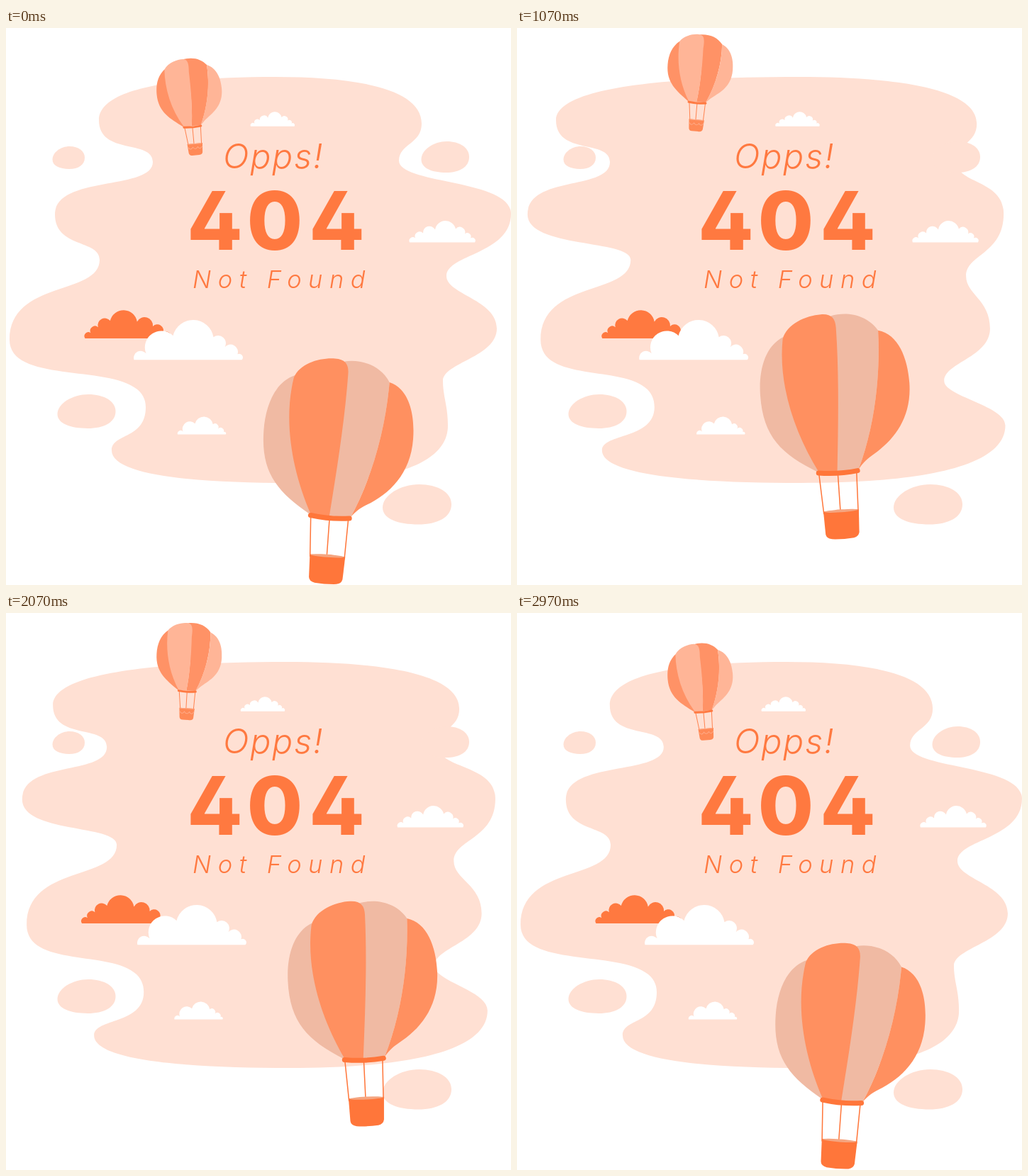
These frames come from a looping animation (712 px wide and 786 px high, 3.01 s). An HTML page:

```html
<!DOCTYPE html>
<html lang="en">
<head>
<meta charset="utf-8">
<title>404 Not Found</title>
<style>
  html, body { margin: 0; width: 100%; height: 100%; overflow: hidden; background: #fff; }
  svg { display: block; width: 100vw; height: 100vh; }
  text { font-family: Inter, "Open Sans", sans-serif; fill: #ff7940; }
  .hello { font-size: 48px; font-weight: 300; font-style: italic; letter-spacing: 2px; }
  .code { font-size: 114px; font-weight: 800; text-anchor: middle; font-feature-settings: "cv02"; }
  .note { font-size: 34.5px; font-weight: 300; font-style: italic; letter-spacing: 9.5px; }
  .line { fill: none; stroke-linecap: round; }
</style>
</head>
<body>
<svg viewBox="0 0 712 786" xmlns="http://www.w3.org/2000/svg">
  <g id="back" fill="#ffe0d3"><path id="blob"/></g>
  <g id="clouds"></g>

  <text class="hello" x="306" y="197.500">Opps!</text>
  <text class="code" x="294.500 379 466.500" y="312.500">404</text>
  <text class="note" x="263" y="367">Not Found</text>

  <g id="small">
    <path fill="#ff9266" d="M226 38C216 46 212 58 212 72C212 98 228 108 245 121H256L240 60Z"/>
    <path fill="#ff9266" d="M254 26C268 24 279 28 286 37C288 65 282 95 270 121H257C260 100 261 75 258 40Z"/>
    <path fill="#ffb597" d="M226 38C232 29 246 25 254 26C260 27 261 33 260 45C261 75 260 100 257 121H246C230 95 224 65 226 38Z"/>
    <path fill="#ffb597" d="M286 37C300 43 304 58 304 72C304 98 286 106 276 115L270 121C282 95 288 65 286 37Z"/>
    <path class="line" stroke="#ff8350" d="M247 123L250 148M258 123V147M269.500 123L268.500 148"/>
    <path class="line" stroke="#ff7a42" stroke-width="3" d="M246 122Q258 123.500 270 122"/>
    <path fill="#ff8a57" d="M248.500 146H270L269 159Q268.500 162.500 264 162.500H254Q250 162.500 249.500 159Z"/>
    <path class="line" stroke="#ffa985" d="M250 146.500H268.500M249.500 151Q252.500 156 256 151Q259.500 156 263 151Q266 156 269 151"/>
  </g>

  <g id="large">
    <path fill="#f0baa3" d="M378 463C350 475 340 510 340 543C340 602 364 628 414 657H440L420 500Z"/>
    <path fill="#f0baa3" d="M447 438C470 433 498 440 512 463C511 530 497 600 471 657H440C446 590 450 520 447 438Z"/>
    <path fill="#ff9060" d="M377 466C384 445 412 435 433 435C448 435 453 442 453 455C453 520 447 590 441 657H415C385 600 366 530 377 466Z"/>
    <path fill="#ff9060" d="M512 463C540 470 551 505 551 540C551 590 523 620 492 638C482 644 476 650 471 657C497 600 511 530 512 463Z"/>
    <path class="line" stroke="#ff763a" stroke-width="1.500" d="M415 661L418 716M441.500 661V714M468 661L466.500 716"/>
    <path class="line" stroke="#ff763a" stroke-width="7" d="M414.500 658Q442 662 469.500 658.500"/>
    <path fill="#ff763a" d="M417.500 713L418.500 745Q419 751 427 752.500Q442 754 458 752.500Q465 751 466 745L467.500 713Z"/>
    <ellipse fill="#f5a580" cx="442.500" cy="713.500" rx="23.500" ry="2"/>
  </g>
</svg>

<script>
const LOOP = 3010;
const { sin, cos, PI } = Math;
const $ = id => document.getElementById(id);
const ease = u => (1 - cos(PI * u)) / 2;
const mix = (a, b, u) => a + (b - a) * u;

function add(parent, fill, d) {
  const path = document.createElementNS("http://www.w3.org/2000/svg", "path");
  path.setAttribute("d", d);
  if (fill) path.setAttribute("fill", fill);
  return parent.appendChild(path);
}

// Lobes and bays of the blob: x, y, sideways travel, roundness.
// The two nodes without roundness are the flat top and bottom.
const NODES = [
  [380, 69, 21],
  [586, 135, 77, .55],
  [554, 187, 80, .45],
  [712, 262, -32, .65],
  [621, 350, 15, .35],
  [692, 424, -31, .55],
  [616, 498, -17, .35],
  [623, 561, 81, .45],
  [400, 642, 0],
  [149, 596, -36, .4],
  [197, 535, -4, .75],
  [5, 440, 35, .75],
  [132, 327, 35, .45],
  [69, 263, -67, .75],
  [207, 189, -94, .55],
  [131, 130, -94, .85]
];

function blobPath(p) {
  const pts = NODES.map(([x, y, shift, round]) => [x + shift * p, y, round]);
  const handle = ([x, y, round], [tx, ty, toRound]) =>
    round ? [x, mix(y, ty, toRound ? round : .78)] : [mix(x, tx, .52), y];
  return pts.reduce((d, a, i) => {
    const b = pts[(i + 1) % pts.length];
    return `${d}C${handle(a, b)} ${handle(b, a)} ${b[0]} ${b[1]}`;
  }, `M${pts[0][0]} ${pts[0][1]}`) + "Z";
}

function pebble(x, y, w, h) {
  const q = (u, v) => `${x + u * w} ${y + v * h} `;
  add($("back"), "", "M" + q(0, .58) +
    "C" + q(0, .27) + q(.26, 0) + q(.53, 0) + "C" + q(.8, 0) + q(1, .2) + q(1, .5) +
    "C" + q(1, .82) + q(.8, 1) + q(.52, 1) + "C" + q(.22, 1) + q(0, .86) + q(0, .58) + "Z");
}
pebble(65.5, 167, 45.5, 32);
pebble(585.5, 160, 67.5, 44);
pebble(72.5, 517, 82, 48);
pebble(531, 644, 97, 56.5);

// Cloud outline: round bumps between points above a flat base.
function bumps(...pts) {
  return pts.reduce((d, [x, y], i) => {
    const [px, py] = pts[i - 1] || [0, 0];
    const r = .51 * Math.hypot(x - px, y - py);
    return `${d}A${r} ${r} 0 0 1 ${x} ${-y}`;
  }, "M0 0") + "Z";
}
const PUFF = bumps([8, 6], [19, 13], [36, 18], [65, 19], [78, 12], [86, 6], [92, 0]);
const HEAP = bumps([17, 9], [55, 34], [112, 32], [128, 18], [146, 8], [152, 0]);

// Each cloud drifts to one side, then the other, then home.
function cloud(d, fill, x, y, size, one, two, flip = 1) {
  const el = add($("clouds"), fill, d), stops = [0, one, two, 0];
  return t => {
    const third = 3 * t / LOOP, n = Math.floor(third);
    const dx = mix(stops[n], stops[n + 1], ease(third - n));
    el.setAttribute("transform", `translate(${x + dx} ${y}) scale(${flip * size} ${size})`);
  };
}
const clouds = [
  cloud(PUFF, "#fff", 345, 138.7, .67, 20, -14),
  cloud(PUFF, "#fff", 569, 302.5, 1, -11, -17),
  cloud(PUFF, "#ff7940", 232, 438, 1.31, 9, -4.5, -1),
  cloud(HEAP, "#fff", 180.5, 468.3, 1, -8, 5),
  cloud(HEAP, "#fff", 242, 573.5, .445, 11.5, -4.5)
];

function pose(el, x, y, angle, cx, cy) {
  el.setAttribute("transform", `translate(${x} ${y}) rotate(${angle}) translate(${-cx} ${-cy})`);
}

function draw(now) {
  const t = now % LOOP, a = 2 * PI * t / LOOP, p = ease(2 * t / LOOP);
  $("blob").setAttribute("d", blobPath(p));
  clouds.forEach(move => move(t));
  pose($("small"), 258.3, 89.4 - 42 * p, 12.5 * p - 5.2, 258, 72);
  // The large balloon circles on a slightly skewed loop.
  const x = 472.5 - 4 * cos(a) - 27 * sin(a) + 5.5 * sin(2 * a);
  const y = 535.5 + 41.5 * cos(a) + 4 * sin(a);
  pose($("large"), x, y, 4.14 - 10 * p, 445.5, 545);
}

function tick() {
  draw(performance.now());
  requestAnimationFrame(tick);
}
tick();
</script>
</body>
</html>
```
